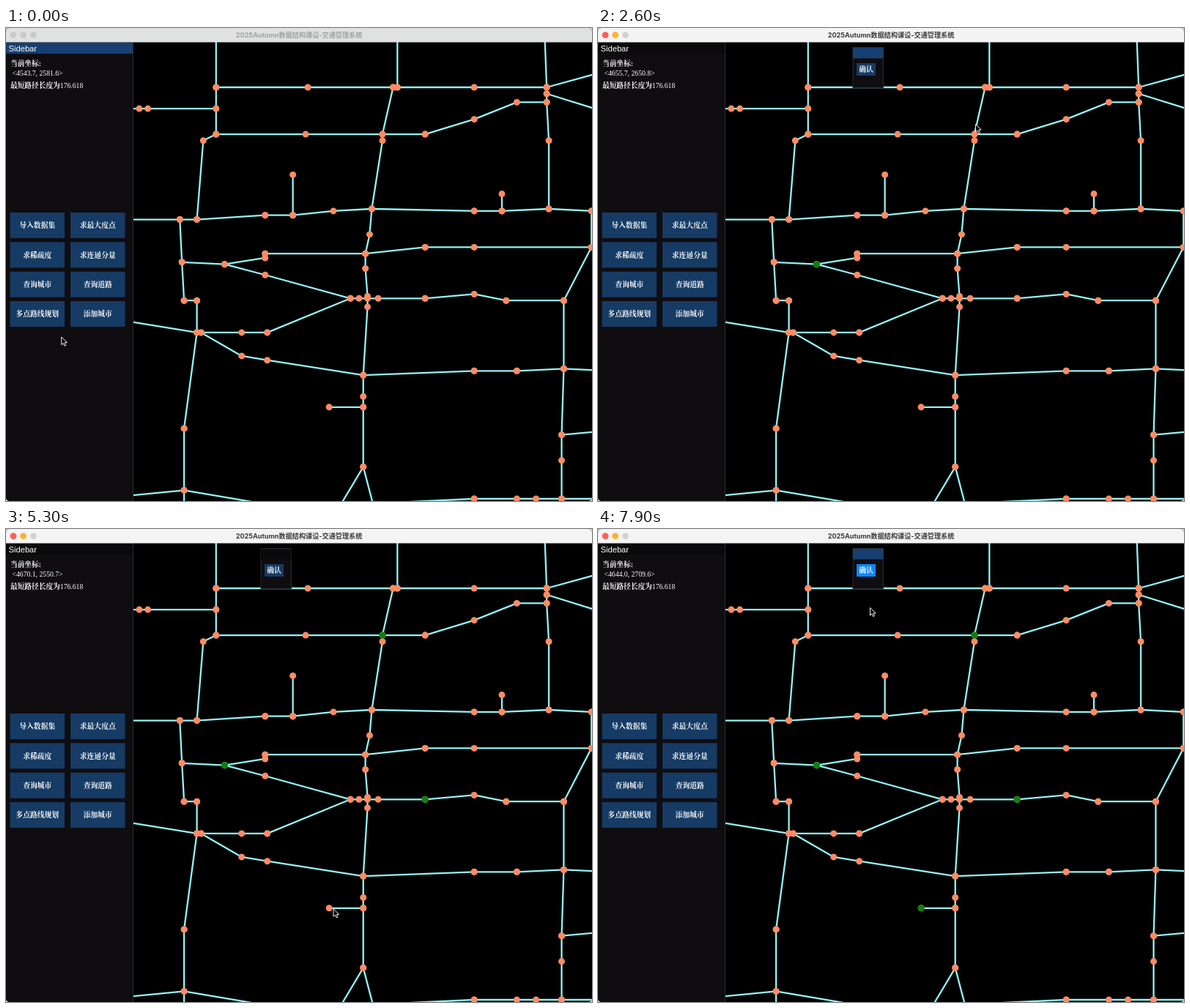
Write an HTML page with a canvas that moves like this. It is 800 px wide and 646 px high and loops after 8000 ms.

```html
<!DOCTYPE html>
<html lang="zh-CN">
<head>
<meta charset="utf-8">
<style>
html, body { margin: 0; width: 800px; height: 646px; overflow: hidden; background: #d8d8d8 }
canvas { display: block }
</style>
</head>
<body>
<canvas width="800" height="646"></canvas>
<script>
const c = document.querySelector('canvas').getContext('2d');
const SERIF = '"Liberation Serif", "Noto Serif CJK SC", "Songti SC", "Noto Sans CJK SC", serif';
const SANS = '"Liberation Sans", Arial, sans-serif';
const TITLE = 'Inter, "Noto Sans CJK SC", sans-serif';
const BUTTON = '#163b64', HOVER = '#3f95f6', PRESSED = '#0f86fb', LIT = '#183f71', DIM = '#0a0a0b';
const LOOP = 8000, LAG = 100;

// Cities sit on a whole-number grid; these are the grid values just out of view
const W = -30, E = 200, N = -26, S = 199;
const px = n => 240.2 + 2.912 * n, py = m => 81 + 2.912 * m;
const roads = [];
const way = (...cities) => roads.push(cities);
const row = (m, ...ns) => way(...ns.map(n => [n, m]));
const col = (n, ...ms) => way(...ms.map(m => [n, m]));

// Streets along the grid
row(0, 16, 59, 99, 101, 137, 171);
row(10, W, -20, -16, 16);
row(22, 16, 58, 94, 114);
row(58, 137, 150);
row(60, 39, 52);
row(62, W, -1, 7);
row(75, 114, 137, 192);
row(78, 39, 86);
row(99, 79, 83, 87, 92, 114);
row(100, 1, 7);
row(100, 152, 179);
row(115, 7, 9, 28, 40);
row(133, 137, 157);
row(150, 69, 85);
row(193, 137, 157, 166, 178, E);
col(1, 160, 189, S);
col(7, 100, 115);
col(16, N, 0, 10, 22);
col(52, 41, 60);
col(85, 135, 145, 150, 178);
col(101, N, 0);
col(150, 50, 58);
col(171, 0, 3, 7);
col(178, 163, 175, 193, S);
col(179, 100, 132);
col(192, 58, 75);

// Slanted roads
way([99, 0], [94, 22], [94, 25], [89, 57], [88, 69], [86, 78], [86, 85], [87, 98], [87, 103], [85, 135]);
way([16, 22], [10, 25], [7, 62], [39, 60]);
way([52, 60], [71, 58], [89, 57], [137, 58]);
way([150, 58], [172, 57], [192, 58]);
way([114, 22], [137, 15], [157, 7], [171, 7], [172, 25], [172, 57]);
way([86, 78], [114, 75]);
way([192, 75], [179, 100]);
way([-1, 62], [0, 82], [1, 100]);
way([0, 82], [20, 83], [39, 80], [39, 78]);
way([20, 83], [39, 88], [79, 99], [40, 115]);
way([7, 115], [1, 160]);
way([9, 115], [28, 126], [40, 128], [85, 135], [137, 133]);
way([114, 99], [137, 97], [152, 100]);
way([157, 133], [179, 132], [E, 133]);
way([179, 132], [178, 163], [E, 161]);
way([170, N], [171, 0], [E, -8]);
way([171, 3], [E, 12]);
way([W, 109], [7, 115]);
way([W, 192], [1, 189], [60, S]);
way([72.5, S], [85, 178], [90.5, S]);
way([50, 197], [137, 193]);

// Picked cities with the time of the click
const picks = [[20, 83, 2300], [94, 22, 3300], [114, 99, 4700], [69, 150, 5500]];

// Pointer moves: leave, arrive, x, y
const home = [79.9, 428.3];
const moves = [
  [-100, 250, 56.3, 394.5],
  [1300, 2000, 298, 322],
  [2400, 2600, 515, 131],
  [2700, 3000, 516, 144],
  [3900, 4500, 572, 369],
  [4800, 5200, 448.4, 518.4],
  [5200, 5500, 441, 518],
  [5700, 6200, 351.3, 137.3],
  [6200, 6700, 372.3, 55.1],
  [7800, 7900, 371, 107]
];

function pointer(t) {
  let [x, y] = home;
  for (const [leave, arrive, tx, ty] of moves) {
    const u = Math.min(1, Math.max(0, (t - leave) / (arrive - leave)));
    const s = u * u * (3 - 2 * u);
    x += (tx - x) * s;
    y += (ty - y) * s;
  }
  return [x, y];
}

function rect(x, y, w, h, fill) {
  c.fillStyle = fill;
  c.fillRect(x, y, w, h);
}

function dot(x, y, r, fill) {
  c.fillStyle = fill;
  c.beginPath();
  c.arc(x, y, r, 0, 7);
  c.fill();
}

function text(s, x, y, font, fill = '#fff', align = 'left') {
  c.font = font;
  c.fillStyle = fill;
  c.textAlign = align;
  c.fillText(s, x, y);
  return x + c.measureText(s).width;
}

function button(label, x, y, w, h, [mx, my], pressed) {
  const over = mx >= x && mx < x + w && my >= y && my < y + h;
  rect(x, y, w, h, over ? pressed ? PRESSED : HOVER : BUTTON);
  text(label, x + w / 2, y + h / 2 + 3.7, '700 9.8px ' + SERIF, '#fff', 'center');
}

function drawMap(t) {
  c.strokeStyle = '#94f2f4';
  c.lineWidth = 2.3;
  c.lineJoin = 'round';
  for (const r of roads) {
    c.beginPath();
    r.forEach(([n, m]) => c.lineTo(px(n), py(m)));
    c.stroke();
  }
  const city = (n, m, fill) => dot(px(n), py(m), 4.5, fill);
  for (const [n, m] of roads.flat()) city(n, m, '#ff8b63');
  for (const [n, m, at] of picks) if (t >= at) city(n, m, '#0a820c');
}

function drawSidebar(t, mouse) {
  rect(0, 19, 174, 627, '#0f0d10');
  rect(173, 19, 1, 627, '#2a2a31');
  rect(0, 20, 173, 15, t < 1200 ? LIT : DIM);
  text('Sidebar', 3.5, 31.5, '11.2px ' + SANS);
  const plain = '9.7px ' + SERIF, bold = '700 ' + plain;
  const [x, y] = mouse;
  text('当前坐标:', 6, 51.5, bold);
  text(`<${(4516.3 + .343 * x).toFixed(1)}, ${(2728.5 - .343 * y).toFixed(1)}>`, 8.5, 65, plain);
  text('176.618', text('最短路径长度为', 6, 82, bold), 82, plain);
  const labels = ['导入数据集', '求最大度点', '求稀疏度', '求连通分量', '查询城市', '查询道路', '多点路线规划', '添加城市'];
  labels.forEach((s, i) =>
    button(s, i % 2 ? 88 : 5.5, 252 + (i >> 1) * 40.35, 74.5, 35, mouse, t >= 1000 && t < 1200));
}

function drawPopup(t, mouse) {
  if (t < 1200) return;
  const lit = t < 3200 || t >= 7700;
  rect(347.5, 26, 42.5, 56, '#2b2b32');
  rect(348.5, 27, 40.5, 54, '#0f0d10');
  rect(348, 27, 41.5, 14.5, lit ? LIT : DIM);
  button('确认', 353, 48, 26, 17, mouse, t >= 7700);
}

function drawTitleBar(active) {
  rect(0, 0, 800, 19.5, active ? '#f4f4f4' : '#e0e2e2');
  const lights = active ? ['#fe5f57', '#fbb52e', '#d2d2d2'] : Array(3).fill('#cacaca');
  lights.forEach((f, i) => dot(10 + i * 13.7, 9.6, 4.4, f));
  text('2025Autumn数据结构课设-交通管理系统', 400, 13, '700 9.15px ' + TITLE, active ? '#3b3939' : '#a1a1a1', 'center');
}

function drawCursor(x, y) {
  c.save();
  c.translate(x, y);
  c.beginPath();
  [[.5, .5], [.5, 11], [3, 8.8], [4.7, 12.6], [6.5, 11.8], [4.9, 8.1], [8.2, 8]].forEach(p => c.lineTo(...p));
  c.closePath();
  c.fillStyle = '#000';
  c.strokeStyle = '#f2f2f2';
  c.lineWidth = 1;
  c.fill();
  c.stroke();
  c.restore();
}

function frame(now) {
  const t = Math.floor(now % LOOP / 100) * 100;
  const mouse = pointer(t - LAG); // the app sees the pointer late
  c.clearRect(0, 0, 800, 646);
  c.save();
  c.beginPath();
  c.roundRect(0, 0, 800, 646, 5);
  c.clip();
  rect(0, 0, 800, 646, '#000');
  drawMap(t);
  drawSidebar(t, mouse);
  drawPopup(t, mouse);
  drawTitleBar(t >= 600);
  c.restore();
  drawCursor(...pointer(t));
  requestAnimationFrame(frame);
}
requestAnimationFrame(frame);
</script>
</body>
</html>
```
